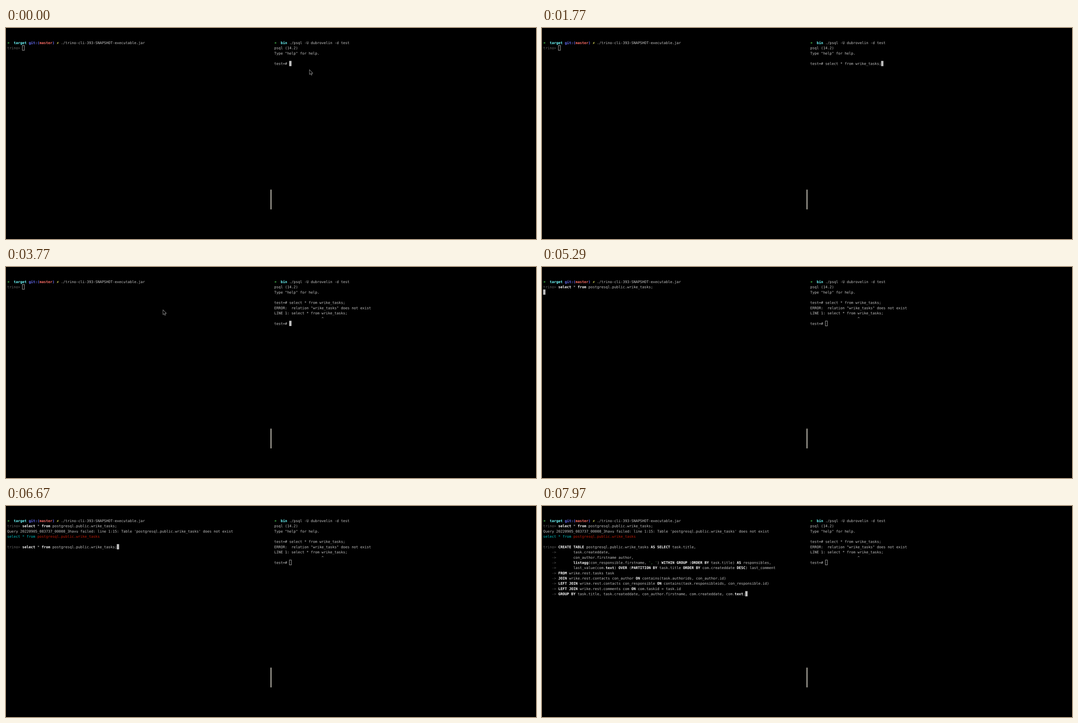
Recreate the animation shown at these times as an HTML page with a canvas. Size 1187 by 472 pixels, loop 7990 ms.

```html
<!DOCTYPE html>
<html lang="en">
<head>
<meta charset="utf-8">
<title>Two terminals</title>
<style>
html, body { margin: 0; width: 100%; height: 100%; overflow: hidden; background: #000; }
canvas { display: block; width: 1187px; height: 472px; }
</style>
</head>
<body>
<canvas id="stage" width="2374" height="944"></canvas>
<script>
const ctx = document.getElementById('stage').getContext('2d');
ctx.scale(2, 2); // double density gives soft, evenly weighted small text
ctx.textRendering = 'geometricPrecision';

const DURATION = 7990;
const CELL = 4.816, ROW = 11.68, TOP = 27.1;
const LEFT = 2.8, RIGHT = 600.8;

const T = { recallRight: 700, runRight: 2280, move: 3240, arrive: 3770, focusLeft: 4090,
  recallLeft: 4400, runLeft: 5030, failLeft: 5430, recallAgain: 6240, create: 7840 };

// Style letter -> [colour, bold]
const STYLES = {
  n: ['#c7c7c7', false], d: ['#686868', false], k: ['#ffffff', true],
  g: ['#5ffa68', true], c: ['#6ffdff', true], b: ['#6a71ff', true],
  r: ['#ff6e67', true], y: ['#fffc67', true],
  t: ['#00c0c2', false], e: ['#c01a06', false], s: ['#55a055', false]
};

// Bold keywords and coloured strings, written as {style|text}
const sql = text => text
  .replace(/'[^']*'/g, '{s|$&}')
  .replace(/\b([A-Z]+|select|from|listagg|text)\b/g, '{k|$&}');
const prompt = text => '{d|trino>} ' + sql(text);

const selectRight = 'select * from wrike_tasks;';
const selectLeft = 'select * from postgresql.public.wrike_tasks;';
const createTable = [
  'CREATE TABLE postgresql.public.wrike_tasks AS SELECT task.title,',
  '       task.createddate,',
  '       con_author.firstname author,',
  "       listagg(con_responsible.firstname, ', ') WITHIN GROUP (ORDER BY task.title) AS responsibles,",
  '       last_value(com.text) OVER (PARTITION BY task.title ORDER BY com.createddate DESC) last_comment',
  'FROM wrike.rest.tasks task',
  'JOIN wrike.rest.contacts con_author ON contains(task.authorids, con_author.id)',
  'LEFT JOIN wrike.rest.contacts con_responsible ON contains(task.responsibleids, con_responsible.id)',
  'LEFT JOIN wrike.rest.comments com ON com.taskid = task.id',
  'GROUP BY task.title, task.createddate, con_author.firstname, com.createddate, com.text;'
].map((line, i) => i ? '    {d|->} ' + sql(line) : prompt(line));

function leftLines(t) {
  const lines = ['{g|➜}  {c|target} {b|git:(}{r|master}{b|)} {y|✗} ./trino-cli-393-SNAPSHOT-executable.jar'];
  lines.push(prompt(t < T.recallLeft ? '' : selectLeft));
  if (t < T.runLeft) return lines;
  if (t < T.failLeft) return [...lines, ''];
  lines.push(
    "Query 20220905_083737_00008_3havu failed: line 1:15: Table 'postgresql.public.wrike_tasks' does not exist",
    '{t|select * from} {e|postgresql.public.wrike_tasks}', '');
  if (t >= T.create) return lines.concat(createTable);
  return [...lines, prompt(t < T.recallAgain ? '' : selectLeft)];
}

function rightLines(t) {
  const lines = ['{g|➜}  {c|bin} ./psql -U dubrovelin -d test', 'psql (14.2)', 'Type "help" for help.', '',
    'test=# ' + (t < T.recallRight ? '' : selectRight)];
  if (t >= T.runRight) lines.push(
    'ERROR:  relation "wrike_tasks" does not exist',
    'LINE 1: ' + selectRight, ' '.repeat(22) + '^', 'test=# ');
  return lines;
}

// Draws one line and returns its length in cells
function drawLine(line, x, y) {
  let col = 0;
  for (const [, style = 'n', styled, plain] of line.matchAll(/\{(\w)\|([^}]*)\}|([^{]+)/g)) {
    const text = styled ?? plain;
    const [color, bold] = STYLES[style];
    ctx.font = `${bold ? 'bold ' : ''}8px "DejaVu Sans Mono", monospace`;
    ctx.fillStyle = color;
    ctx.fillText(text, x + col * CELL, y);
    col += text.length;
  }
  return col;
}

function drawPane(lines, x, focused) {
  let col = 0;
  lines.forEach((line, i) => { col = drawLine(line, x, TOP + i * ROW + 8.9); });
  const cx = x + col * CELL - 0.3, cy = TOP + (lines.length - 1) * ROW - 0.2;
  ctx.fillStyle = ctx.strokeStyle = '#c0c0c0';
  ctx.lineWidth = 0.9;
  if (focused) ctx.fillRect(cx, cy, 5.2, ROW);
  else ctx.strokeRect(cx + 0.5, cy + 0.5, 4.4, ROW - 0.8);
}

const arrow = new Path2D('M0 0V9.3L2.1 7.4L3.7 11L5.1 10.4L3.6 6.9H6.5Z');

function drawPointer(t) {
  if (t >= T.recallRight && t < T.move || t >= T.recallLeft) return;
  const p = Math.min(1, Math.max(0, (t - T.move) / (T.arrive - T.move)));
  const ease = p * p * (3 - 2 * p);
  ctx.save();
  ctx.translate(680 - 328 * ease, 94 + 2.5 * ease);
  ctx.strokeStyle = '#e8e8e8';
  ctx.fillStyle = '#000';
  ctx.lineWidth = 1.1;
  ctx.stroke(arrow);
  ctx.fill(arrow);
  ctx.restore();
}

function draw(t) {
  ctx.fillStyle = '#000';
  ctx.fillRect(0, 0, 1187, 472);
  drawPane(leftLines(t), LEFT, t >= T.focusLeft);
  drawPane(rightLines(t), RIGHT, t < T.focusLeft);

  ctx.fillStyle = '#918e86';
  ctx.beginPath();
  ctx.roundRect(592, 361.2, 3, 44.8, 1.5);
  ctx.fill();

  drawPointer(t);
}

const start = performance.now();
function tick() {
  draw((performance.now() - start) % DURATION);
  requestAnimationFrame(tick);
}
tick();
</script>
</body>
</html>
```
